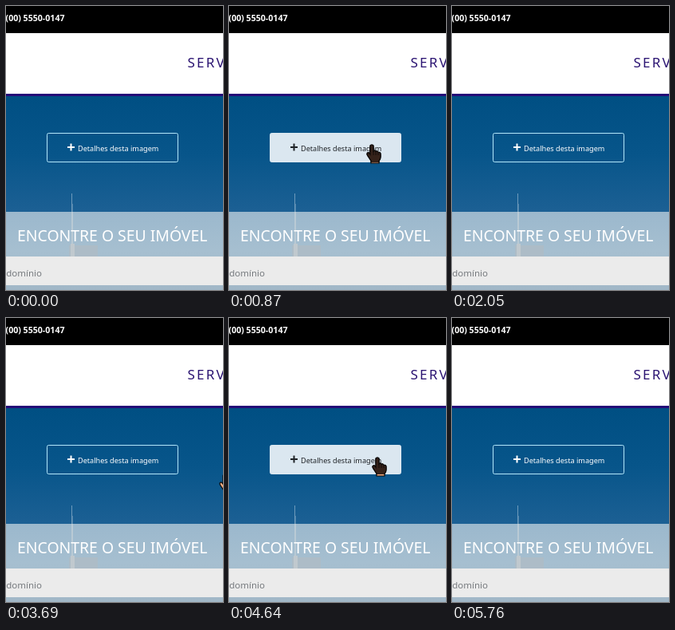
An HTML page with a canvas for the animation above (6310 ms loop, 272 by 356 pixels).

```html
<!DOCTYPE html>
<html lang="pt-BR">
<head>
<meta charset="utf-8">
<style>
html, body { margin: 0; width: 100%; height: 100%; overflow: hidden; background: #000; }
canvas { display: block; }
</style>
</head>
<body>
<canvas id="stage" width="272" height="356"></canvas>
<script>
const ctx = document.getElementById('stage').getContext('2d');
const LOOP = 6310, STEP = 80;
const SANS = '"Noto Sans", "Open Sans", sans-serif';
const BUTTON = { x: 51, y: 159, w: 165, h: 37 };

// Pointer moves: start time, number of steps, start point, end point, easing
const easeOut = power => p => 1 - (1 - p) ** power;
const easeIn = power => p => p ** power;
const moves = [
  { at: 150, steps: 6, from: [320, 173], to: [180, 174], ease: easeOut(2.5) },
  { at: 870, steps: 1, from: [180, 174], to: [179, 174], ease: easeIn(1) },
  { at: 1250, steps: 8, from: [179, 174], to: [214, 190], ease: easeIn(1.3) },
  { at: 1890, steps: 3, from: [214, 190], to: [285, 191], ease: easeIn(1.3) },
  { at: 3690, steps: 8, from: [300, 202], to: [189, 177], ease: easeOut(2) },
  { at: 4480, steps: 3, from: [189, 177], to: [186, 175], ease: easeIn(1) },
  { at: 4950, steps: 8, from: [186, 175], to: [214, 186], ease: easeIn(1.3) },
  { at: 5600, steps: 3, from: [214, 186], to: [285, 211], ease: easeIn(1.3) }
];

const hand = new Path2D(
  'M-2 2 Q-2 0 0 0 Q2 0 2 2 L2 8 Q4 6 5 8.5 Q7 7 8 9.5 Q11 8.5 11 12 ' +
  'L11 15 Q11 18 9 20 L9 23 L-1 23 L-1 20 L-5 14 Q-7 11 -5 10 Q-4 9 -2 12 Z');
const creases = new Path2D('M2 8 V13 M5 9 V13 M8 10 V13');

const ramp = (t, a, b) => Math.min(1, Math.max(0, (t - a) / (b - a)));
const mix = (a, b, k) => `rgb(${a.map((v, i) => Math.round(v + (b[i] - v) * k))})`;

function rect(x, y, w, h, fill) {
  ctx.fillStyle = fill;
  ctx.fillRect(x, y, w, h);
}

function gradient(x0, y0, x1, y1, ...colors) {
  const g = ctx.createLinearGradient(x0, y0, x1, y1);
  colors.forEach((c, i) => g.addColorStop(i / (colors.length - 1), c));
  return g;
}

function label(text, x, y, size, color, { weight = 400, align = 'left', spacing = 0 } = {}) {
  ctx.font = `${weight} ${size}px ${SANS}`;
  ctx.letterSpacing = spacing + 'px';
  ctx.textAlign = align;
  ctx.fillStyle = color;
  ctx.fillText(text, x, y);
}

function drawPage() {
  rect(0, 0, 272, 34, '#000');
  label('(00) 5550-0147', 73.5, 19, 10.6, '#fff', { weight: 700, align: 'right' });
  rect(0, 34, 272, 76, '#fff');
  label('SERVIÇOS', 227.5, 77, 17, '#2b1472', { spacing: 2.2 });
  rect(0, 110, 272, 3, '#250a78');

  rect(0, 113, 272, 145, gradient(0, 113, 0, 258, '#004f83', '#07558a', '#1c6094'));
  rect(82, 235, 1, 23, '#6d9abb');
  rect(83, 248, 1, 10, '#4d83ab');

  rect(0, 258, 272, 98, gradient(0, 258, 0, 356, '#9bb8cd', '#a6bfd0', '#a1b7c7'));
  rect(82, 258, 2, 42, '#b9cad5');
  rect(79, 300, 36, 14, '#adbcc7');
  rect(81, 298, 5, 16, '#c0c9ce');
  label('ENCONTRE O SEU IMÓVEL', 14, 295, 19.4, '#fff');

  rect(0, 314, 272, 36, '#ebebeb');
  label('condomínio', 45, 339, 11.5, '#777b7f', { align: 'right' });
}

function drawButton(hover) {
  const { x, y, w, h } = BUTTON;
  ctx.beginPath();
  ctx.roundRect(x + .5, y + .5, w - 1, h - 1, 2);
  ctx.fillStyle = `rgba(219, 231, 240, ${hover})`;
  ctx.fill();
  ctx.strokeStyle = mix([181, 230, 250], [219, 231, 240], hover);
  ctx.lineWidth = 1;
  ctx.stroke();

  const ink = mix([255, 255, 255], [32, 36, 40], hover);
  rect(77, 176, 9, 2, ink);
  rect(80.5, 172.5, 2, 9, ink);
  label('Detalhes desta imagem', 90, 182, 9.15, ink);
}

function paintHand(x, y, fill) {
  ctx.save();
  ctx.translate(x, y);
  ctx.fillStyle = fill;
  ctx.fill(hand);
  ctx.strokeStyle = '#0b0908';
  ctx.lineWidth = 1.2;
  ctx.stroke(hand);
  ctx.lineWidth = .8;
  ctx.stroke(creases);
  ctx.restore();
}

// The hand is dark over the button and light elsewhere
function drawPointer(x, y, hover) {
  paintHand(x, y, '#f4ac80');
  if (!hover) return;
  ctx.save();
  ctx.beginPath();
  ctx.rect(BUTTON.x, BUTTON.y, BUTTON.w, BUTTON.h);
  ctx.clip();
  paintHand(x, y, '#35221a');
  ctx.restore();
}

function pose(t) {
  const move = moves.findLast(m => m.at <= t);
  if (!move) return { x: 300, y: 173, hover: 0 };
  const step = Math.min(move.steps - 1, Math.floor((t - move.at) / STEP));
  const k = move.ease((step + 1) / move.steps);
  const [x, y] = move.from.map((v, i) => v + (move.to[i] - v) * k);
  const held = move.at + step * STEP;
  const hover = ramp(held, 230, 390) - ramp(held, 1810, 2050)
    + ramp(held, 4010, 4170) - ramp(held, 5510, 5760);
  return { x, y, hover };
}

function render(now) {
  const { x, y, hover } = pose(now % LOOP);
  drawPage();
  drawButton(hover);
  if (x < 280) drawPointer(x, y, hover);
}

const start = performance.now();
function tick() {
  render(performance.now() - start);
  requestAnimationFrame(tick);
}
tick();
</script>
</body>
</html>
```
